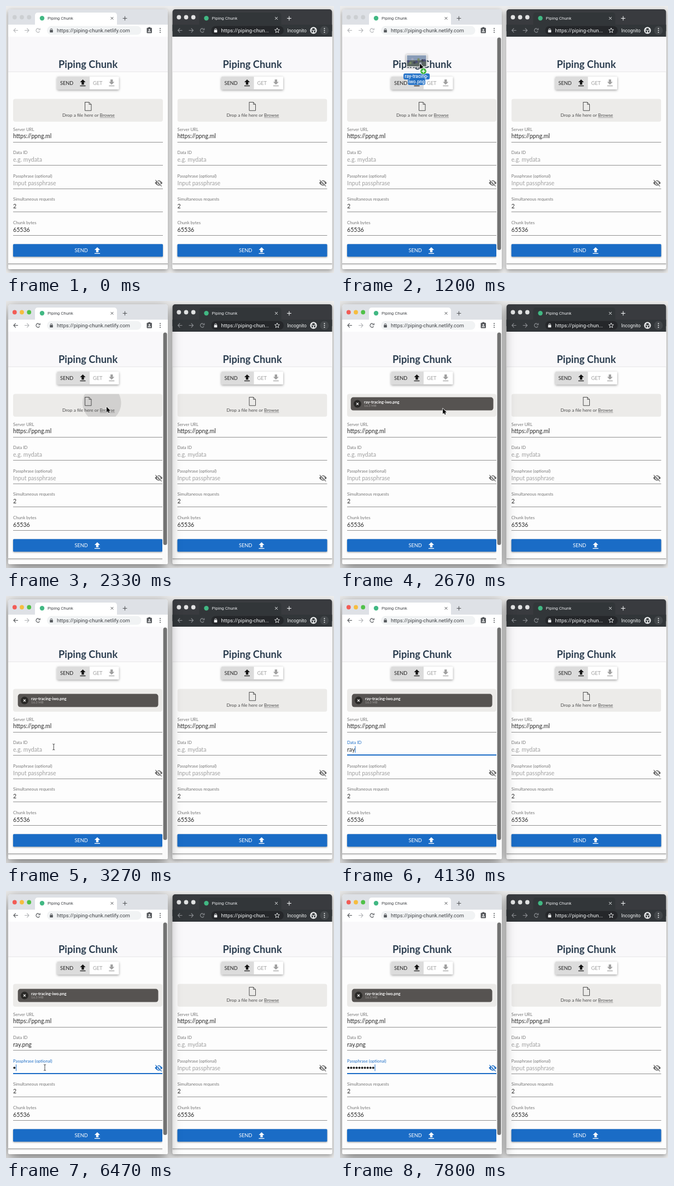
An HTML page with a canvas that plays this animation: 600x487 px, repeating every 8000 ms.

```html
<!DOCTYPE html>
<html lang="en">
<head>
<meta charset="utf-8">
<title>Piping Chunk</title>
<style>
html, body { margin: 0; width: 100%; height: 100%; overflow: hidden; background: #ececec; }
canvas { display: block; width: 600px; height: 487px; }
</style>
</head>
<body>
<canvas id="stage"></canvas>
<script>
const W = 600, H = 487, LOOP = 8000;
const canvas = document.getElementById('stage');
const c = canvas.getContext('2d');
const dpr = window.devicePixelRatio || 1;
canvas.width = W * dpr;
canvas.height = H * dpr;

const UI = 'Roboto, sans-serif', PAGE = 'Lato, sans-serif';
const BLUE = '#1a6cc6';
const UP = new Path2D('M5 20h14v-2H5zM5 10h4v6h6v-6h4l-7-7z');
const DOWN = new Path2D('M19 9h-4V3H9v6H5l7 7zM5 18v2h14v-2z');

// Timeline
const DRAG_IN = 700, SCROLLBAR = 1000, DROP = 2200, CARD = 2420;
const ID_FOCUS = 3400, PASS_FOCUS = 5930;
const ID_TEXT = 'ray.png';
const ID_KEYS = [3780, 3950, 4110, 4400, 4580, 4760, 4950];
const PASS_KEYS = [6310, 6680, 6810, 6950, 7080, 7210, 7400, 7530, 7730, 7790];
const POINTER = [
  [700, 104, 59], [870, 129, 74], [1000, 129, 74], [1530, 182, 170],
  [1850, 184, 192], [2330, 184, 193], [2670, 188, 196], [2850, 188, 196],
  [3350, 80, 281], [5200, 80, 283], [5530, 121, 348], [5880, 71, 322]
];

const clamp = v => Math.max(0, Math.min(1, v));
const ramp = (t, from, ms) => clamp((t - from) / ms);
const smooth = v => v * v * (3 - 2 * v);
const mix = (a, b, k) => a + (b - a) * k;

function along(keys, t) {
  let i = 0;
  while (i < keys.length - 2 && t > keys[i + 1][0]) i++;
  const [t0, x0, y0] = keys[i], [t1, x1, y1] = keys[i + 1];
  const k = smooth(ramp(t, t0, t1 - t0));
  return [mix(x0, x1, k), mix(y0, y1, k)];
}

function rect(x, y, w, h, fill, r = 0) {
  c.beginPath();
  c.roundRect(x, y, w, h, r);
  c.fillStyle = fill;
  c.fill();
}

function circle(x, y, r, fill) {
  c.beginPath();
  c.arc(x, y, r, 0, 7);
  c.fillStyle = fill;
  c.fill();
}

function line(color, width, ...pts) {
  c.beginPath();
  for (let i = 0; i < pts.length; i += 2) c.lineTo(pts[i], pts[i + 1]);
  c.strokeStyle = color;
  c.lineWidth = width;
  c.stroke();
}

function text(s, x, y, size, color, font = PAGE, weight = 400) {
  c.font = `${weight} ${size}px ${font}`;
  c.fillStyle = color;
  c.fillText(s, x, y);
  return c.measureText(s).width;
}

function shadowed(blur, dy, alpha, draw) {
  c.save();
  c.shadowColor = `rgba(0,0,0,${alpha})`;
  c.shadowBlur = blur * dpr;
  c.shadowOffsetY = dy * dpr;
  draw();
  c.restore();
}

function icon(path, x, y, color) {
  c.save();
  c.translate(x, y);
  c.scale(.72, .72);
  c.translate(-12, -11.5);
  c.fillStyle = color;
  c.fill(path);
  c.restore();
}

function cross(x, y, r, color, width) {
  line(color, width, x - r, y - r, x + r, y + r);
  line(color, width, x - r, y + r, x + r, y - r);
}

function plus(x, y, r, color, width) {
  line(color, width, x - r, y, x + r, y);
  line(color, width, x, y - r, x, y + r);
}

function eyeOff(x, y, color, back) {
  c.beginPath();
  c.moveTo(x - 7, y);
  c.quadraticCurveTo(x, y - 9.5, x + 7, y);
  c.quadraticCurveTo(x, y + 9.5, x - 7, y);
  c.fillStyle = color;
  c.fill();
  circle(x, y, 3.2, back);
  circle(x, y, 1.9, color);
  line(back, 1.3, x - 5, y - 6.3, x + 6.4, y + 5.1);
  line(color, 1.2, x - 6, y - 5.4, x + 5.4, y + 6);
}

function arrowIcon(x, y, dir, color) {
  line(color, 1.1, x - 4 * dir, y, x + 4 * dir, y);
  line(color, 1.1, x + .3 * dir, y - 3.8, x + 4 * dir, y, x + .3 * dir, y + 3.8);
}

function reload(x, y, color) {
  c.beginPath();
  c.arc(x, y, 3.4, .5, 5.5);
  c.strokeStyle = color;
  c.lineWidth = 1.1;
  c.stroke();
  line(color, 1.1, x + 3.8, y - 4, x + 3.8, y - 1, x + .6, y - 1);
}

function lock(x, y, color) {
  rect(x - 2.8, y - 1, 5.6, 4.8, color, .6);
  c.beginPath();
  c.arc(x, y - 1.4, 1.8, Math.PI, 0);
  c.strokeStyle = color;
  c.lineWidth = .9;
  c.stroke();
}

function star(x, y, color) {
  c.beginPath();
  for (let i = 0; i < 10; i++) {
    const a = i * Math.PI / 5 - Math.PI / 2, r = i % 2 ? 2.1 : 4.7;
    c.lineTo(x + r * Math.cos(a), y + r * Math.sin(a));
  }
  c.closePath();
  c.strokeStyle = color;
  c.lineWidth = .9;
  c.stroke();
}

function menuDots(x, y, color) {
  for (const d of [-3.5, 0, 3.5]) circle(x, y + d, 1, color);
}

function browserBar(dark, active) {
  const bar = dark ? '#323639' : '#ffffff';
  const ink = dark ? '#f1f3f4' : '#55585c';
  const faint = dark ? '#8b8e92' : '#b4b6b9';
  rect(4, 6, 292, 40, dark ? '#393b3f' : '#dee1e6', [5, 5, 0, 0]);
  const lights = active ? ['#f25c56', '#f6bd3f', '#50c148']
    : Array(3).fill(dark ? '#e2e2e3' : '#cccfd2');
  lights.forEach((col, i) => circle(15.8 + i * 13.2, 20.5, 3.9, col));
  rect(53, 12, 150, 24, bar, [5, 5, 0, 0]);
  rect(4, 34, 292, 22, bar);
  circle(66, 22.3, 4.2, '#41b883');
  text('Piping Chunk', 76, 25.3, 8, dark ? '#e4e6e8' : '#44474b', UI);
  cross(194, 22.4, 2.4, ink, 1);
  plus(217.5, 22.5, 3.9, ink, 1.1);
  arrowIcon(18, 44.5, -1, active ? '#55585c' : faint);
  arrowIcon(38, 44.5, 1, faint);
  reload(58.5, 44.5, active ? '#55585c' : faint);

  const end = dark ? 207.5 : 247.5;
  rect(75, 36.5, end - 75, 16, dark ? '#25272a' : '#f1f3f4', 8);
  lock(83, 44.5, ink);
  text(dark ? 'https://piping-chun...' : 'https://piping-chunk.netlify.com',
    93, 47.7, 9.5, dark ? '#f1f3f4' : '#3f4246', UI);
  if (dark) {
    star(195.5, 44.7, ink);
    text('Incognito', 214, 47.6, 8.5, '#f1f3f4', UI);
    circle(262, 44.5, 6.2, '#f1f3f4');
    rect(259.7, 40.6, 4.6, 3, '#323639', 1);
    rect(257.6, 43.4, 8.8, 1, '#323639');
    circle(259.8, 46.7, 1.6, '#323639');
    circle(264.2, 46.7, 1.6, '#323639');
    circle(282, 44.5, 8, '#43474a');
  } else {
    rect(257.5, 39.8, 9.4, 9.6, '#55585c', 1);
    rect(260.2, 38.6, 4, 2.5, '#55585c', 1);
    circle(262.2, 43.6, 1.4, '#ffffff');
    rect(259.6, 45.8, 5.2, 1.8, '#ffffff', [1, 1, 0, 0]);
  }
  menuDots(282, 44.5, ink);
}

function toggleGroup() {
  shadowed(4, 1.5, .38, () => rect(93.6, 128.8, 113, 23.4, '#ffffff', 1.5));
  rect(93.6, 128.8, 59.4, 23.4, '#dcdcdc', [1.5, 0, 0, 1.5]);
  text('SEND', 99, 143.8, 9.2, '#222222');
  icon(UP, 140.5, 140.2, '#161616');
  text('GET', 159, 143.8, 9.2, '#a0a0a0');
  icon(DOWN, 193.3, 140.2, '#a0a0a0');
}

function dropZone(right, t) {
  const added = ramp(t, CARD - 60, 150);
  c.save();
  c.beginPath();
  c.roundRect(13, 169.5, right - 13, 41.5, 4);
  c.clip();
  rect(13, 169, right - 13, 43, '#ecebe9');

  const blob = ramp(t, 1600, 250) * (1 - ramp(t, 2340, 190));
  if (blob > 0) {
    const grow = mix(10, 35.3, smooth(ramp(t, 1600, 300))) + 50 * ramp(t, 2340, 190);
    circle(175.3, 186, grow, `rgba(0,0,0,${.115 * blob})`);
  }
  c.globalAlpha = 1 - added;
  line('#4a4a4a', 1, 144.5, 175.5, 152, 175.5, 156, 179.5, 156, 190.8, 144.5, 190.8, 144.5, 175);
  line('#4a4a4a', .9, 152, 175.5, 152, 179.5, 156, 179.5);
  const w = text('Drop a file here or ', 103, 202, 8.35, '#4a4a4a');
  const w2 = text('Browse', 103 + w, 202, 8.35, '#4a4a4a');
  line('#888888', .7, 103 + w, 203.6, 103 + w + w2, 203.6);

  if (t > CARD) {
    const settle = smooth(ramp(t, 2690, 250));
    const x = mix(19.7, 21.7, settle), y = mix(175.6, 178.6, settle);
    c.globalAlpha = ramp(t, CARD, 180);
    rect(x, y, 300.2 - 2 * x, 24, '#565351', 4.5);
    circle(x + 12.2, y + 12, 7, '#2a2927');
    cross(x + 12.2, y + 12, 2, '#ffffff', 1.2);
    text('ray-tracing-iwo.png', x + 24.4, y + 11.1, 7.4, '#ffffff', PAGE, 700);
    text('16.3 MB', x + 24.4, y + 17.4, 5.9, '#a3a09e');
  }
  c.restore();
}

function caret(x, y, t, last) {
  if ((t - last) % 1060 < 530) line(BLUE, 1, x, y - 6.2, x, y + 5.8);
}

function field(i, label, value, right, focus, hint) {
  const y = 225 + i * 42.6, base = Math.round(y + 22.5) + .5;
  text(label, 13, y + 2.6, 7.75, focus > .5 ? BLUE : '#757575');
  if (value) text(value, 13, y + 16.4, 10.6, hint ? '#a0a0a0' : '#2b2b2b');
  line('#909090', 1, 13, base, right, base);
  if (focus > 0) {
    const half = (right - 13) / 2 * focus, mid = (right + 13) / 2;
    line(BLUE, 2, mid - half, base - .5, mid + half, base - .5);
  }
}

function page(t, left) {
  const right = left && t >= SCROLLBAR ? 286 : 287;
  const now = left ? t : 0;
  rect(4, 56, 292, 424, '#fdfdfd', [0, 0, 3, 3]);
  rect(4, 56, 292, 64, '#f9f8fa');
  rect(4, 119.5, 292, 1, '#e6e6e8');
  text('Piping Chunk', 96, 113, 18.3, '#2c3e50', PAGE, 700);
  toggleGroup();
  dropZone(right, now);

  const idCount = ID_KEYS.filter(k => k <= now).length;
  const dots = PASS_KEYS.filter(k => k <= now).length;
  const idFocus = smooth(ramp(now, ID_FOCUS, 250)) * (1 - smooth(ramp(now, PASS_FOCUS, 250)));
  const passFocus = smooth(ramp(now, PASS_FOCUS, 250));

  field(0, 'Server URL', 'https://ppng.ml', right, 0);
  field(1, 'Data ID', ID_TEXT.slice(0, idCount) || 'e.g. mydata', right, idFocus, !idCount);
  field(2, 'Passphrase (optional)', dots ? '' : 'Input passphrase', right, passFocus, true);
  field(3, 'Simultaneous requests', '2', right, 0);
  field(4, 'Chunk bytes', '65536', right, 0);

  for (let i = 0; i < dots; i++) circle(15.3 + i * 5.05, 322.6, 2, '#222222');
  if (now >= ID_FOCUS && now < PASS_FOCUS) {
    c.font = `400 10.6px ${PAGE}`;
    const x = 13.5 + c.measureText(ID_TEXT.slice(0, idCount)).width;
    caret(x, 280, now, idCount ? ID_KEYS[idCount - 1] : ID_FOCUS);
  }
  if (now >= PASS_FOCUS)
    caret(13.5 + dots * 5.05, 322.6, now, dots ? PASS_KEYS[dots - 1] : PASS_FOCUS);
  eyeOff(279.3, 322.8, passFocus > .5 ? BLUE : '#666666', '#fdfdfd');

  shadowed(3, 1.2, .35, () => rect(13, 434.2, right - 13, 23.1, BLUE, 1.5));
  text('SEND', 125.5, 449.2, 9.2, '#ffffff');
  icon(UP, 167, 446, '#ffffff');
  rect(4, 469.4, 292, 1.6, '#a9a9a9');
  rect(4, 471, 292, 2, '#ececec');

  if (left && t >= SCROLLBAR) {
    rect(286, 56, 10, 424, '#fafafa', [0, 0, 3, 0]);
    rect(287.6, 57.5, 7, 387.5, '#727272', 3.5);
  }
}

function browser(t, left) {
  const active = left && t >= DROP;
  c.save();
  c.translate(left ? 0 : 300.5, 0);
  shadowed(active ? 23 : 9, active ? 7 : 3, active ? .52 : .38,
    () => rect(4, 6, 292, 474, '#ffffff', [5, 5, 3, 3]));
  browserBar(!left, active);
  page(t, left);
  c.restore();
}

function dragItem(px, py) {
  const x = px - 6, y = py - 5;
  c.save();
  c.globalAlpha = .92;
  shadowed(4, 1, .5, () => rect(x - 19, y - 11.5, 38, 23, '#f5f5f5'));
  rect(x - 17.5, y - 10, 35, 20, '#8296b4');
  rect(x - 17.5, y - 1, 35, 11, '#59645f');
  const cols = ['#4c4d78', '#7a8c61', '#a5a9bd', '#3d4251'];
  for (let i = 0; i < 9; i++)
    circle(x - 15 + i * 3.7, y + 1 + 4 * Math.sin(i * 2.3), 2.3, cols[i % 4]);
  rect(x - 24, y + 23, 48, 11, BLUE, 3);
  rect(x - 16, y + 33, 32, 11, BLUE, 3);
  c.textAlign = 'center';
  text('ray-tracing-', x, y + 31.3, 8.4, '#ffffff', UI, 500);
  text('iwo.png', x, y + 41, 8.4, '#ffffff', UI, 500);
  c.restore();
}

function arrowPointer(x, y) {
  c.beginPath();
  for (const [dx, dy] of [[0, 0], [0, 10], [2.3, 7.9], [3.9, 11.3], [5.5, 10.6], [4, 7.3], [7.1, 7.2]])
    c.lineTo(x + dx, y + dy);
  c.closePath();
  c.lineJoin = 'round';
  c.strokeStyle = '#ffffff';
  c.lineWidth = 1.5;
  c.stroke();
  c.fillStyle = '#000000';
  c.fill();
}

function iBeam(x, y) {
  line('#333333', .9, x, y - 5, x, y + 5);
  line('#333333', .9, x - 2, y - 5.5, x, y - 4.8, x + 2, y - 5.5);
  line('#333333', .9, x - 2, y + 5.5, x, y + 4.8, x + 2, y + 5.5);
}

function pointer(t) {
  const shown = (t >= DRAG_IN && t < ID_KEYS[0]) || (t >= 5200 && t < 6530);
  if (!shown) return;
  const [x, y] = along(POINTER, t);
  const dragging = t < DROP;
  if (dragging) dragItem(x, y);
  const overInput = (t > 3200 && t < 5300) || t > 5800;
  if (overInput) iBeam(x, y);
  else arrowPointer(x, y);
  if (dragging && t >= SCROLLBAR) {
    circle(x + 6.5, y + 14, 6, '#ffffff');
    circle(x + 6.5, y + 14, 5.4, '#3cb53c');
    plus(x + 6.5, y + 14, 3.2, '#ffffff', 1.5);
  }
}

function draw(t) {
  c.setTransform(dpr, 0, 0, dpr, 0, 0);
  rect(0, 0, W, H, '#ececec');
  browser(t, false);
  browser(t, true);
  pointer(t);
}

const start = performance.now();
function tick() {
  draw((performance.now() - start) % LOOP);
  requestAnimationFrame(tick);
}
tick();
</script>
</body>
</html>
```
